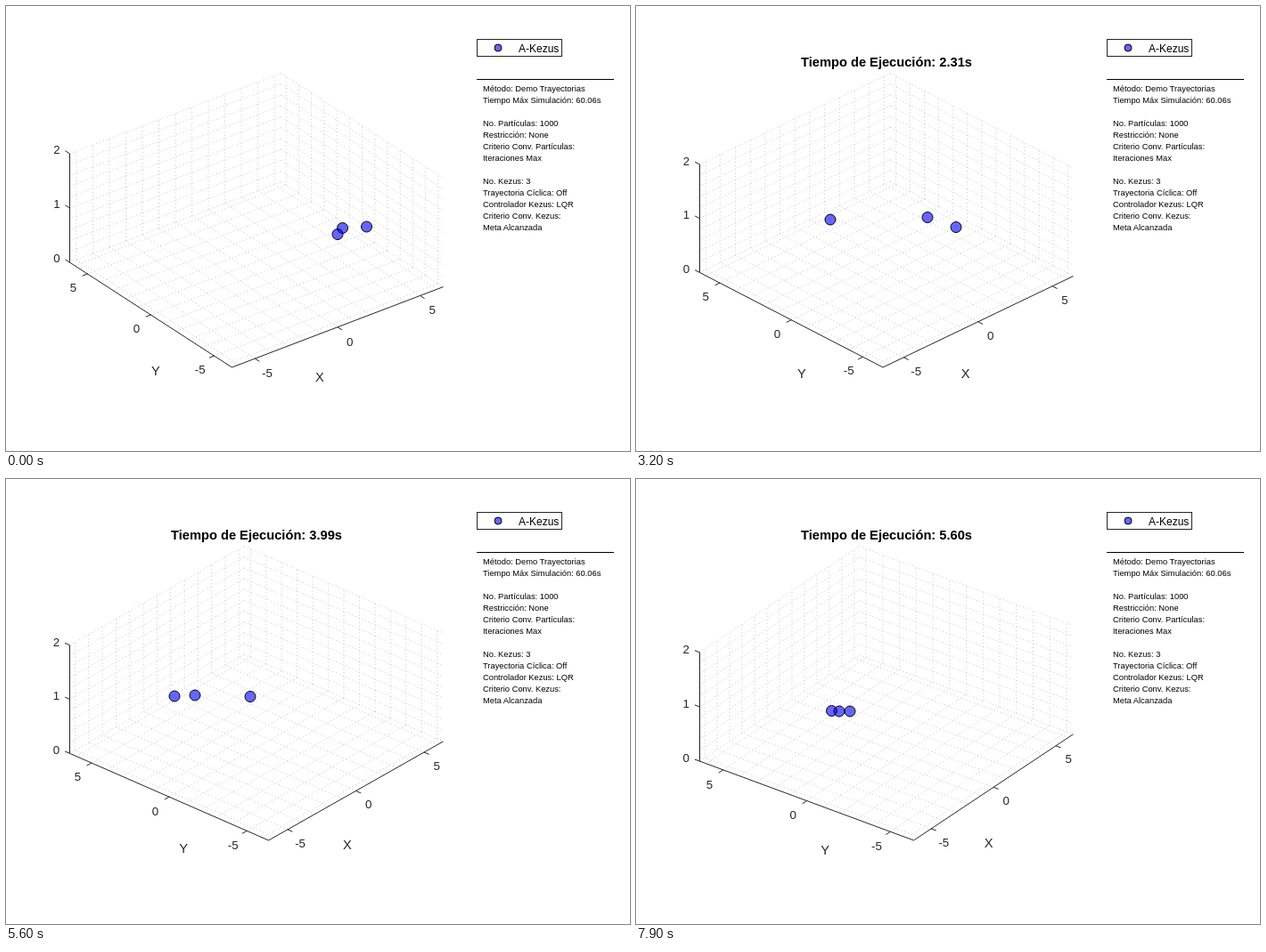
These frames come from a looping animation (700x500 px, 8 s). An HTML page:

```html
<!DOCTYPE html>
<html lang="es">
<head>
<meta charset="utf-8">
<title>Demo Trayectorias</title>
<style>
  html, body { margin: 0; width: 100%; height: 100%; overflow: hidden; background: #fff; }
  svg { display: block; font-family: "Liberation Sans", Arial, sans-serif; fill: #262626; }
  .grid { fill: none; stroke: #c6c6c6; stroke-dasharray: 1 3; }
  .axes { fill: none; stroke: #262626; }
  .puck { fill: #00f; fill-opacity: .6; stroke: #000; }
  .mid { text-anchor: middle; }
  .tick { font-size: 13.33px; }
  .name { font-size: 14.67px; }
  .title { font-size: 14.67px; font-weight: bold; fill: #000; }
  .info { font-size: 9.33px; fill: #000; }
</style>
</head>
<body>
<svg id="stage" width="700" height="500" viewBox="0 0 700 500"></svg>
<script>
const stage = document.getElementById("stage");

function add(tag, attrs, text) {
  const node = document.createElementNS("http://www.w3.org/2000/svg", tag);
  for (const key in attrs) node.setAttribute(key, attrs[key]);
  if (text) node.textContent = text;
  return stage.appendChild(node);
}
// Baselines sit on whole pixels
const place = (node, x, y) => {
  node.setAttribute("x", x.toFixed(2));
  node.setAttribute("y", Math.round(y));
};

const STEP = 100, LOOP = 8000, LAST = LOOP / STEP - 1;
const BOX = { left: 71.5, right: 490.5, top: 75.5, bottom: 406 };
const LIMIT = 6.4, Z_MAX = 2, TICK = 6;

const grid = add("path", { class: "grid" });
const axes = add("path", { class: "axes" });
const tickText = value => add("text", { class: "tick mid" }, String(value));
const labels = {
  x: [-5, 0, 5].map(v => [v, tickText(v)]),
  y: [-5, 0, 5].map(v => [v, tickText(v)]),
  z: [0, 1, 2].map(v => [v, tickText(v)])
};
const nameX = add("text", { class: "name mid" }, "X");
const nameY = add("text", { class: "name mid" }, "Y");
const title = add("text", { class: "title mid", x: 281, y: 68 });

// Legend and settings
add("rect", { x: 528.5, y: 37.5, width: 95, height: 19, fill: "#fff", stroke: "#262626" });
add("circle", { class: "puck", cx: 552, cy: 47, r: 4 });
add("text", { x: 575, y: 52, "font-size": 12, fill: "#000" }, "A-Kezus");
add("path", { d: "M528 82.5H682", stroke: "#000" });
[
  "Método: Demo Trayectorias", "Tiempo Máx Simulación: 60.06s", "",
  "No. Partículas: 1000", "Restricción: None", "Criterio Conv. Partículas:", "Iteraciones Max", "",
  "No. Kezus: 3", "Trayectoria Cíclica: Off", "Controlador Kezus: LQR",
  "Criterio Conv. Kezus:", "Meta Alcanzada"
].forEach((line, i) => add("text", { class: "info", x: 535, y: 96 + 13 * i }, line));

// Robot paths: screen positions at key steps
const keys = [0, 19, 32, 41, 56, 65, 79];
const pucks = [
  { x: [404.5, 274, 218, 201, 189, 186, 219.5], y: [248, 240.5, 240, 241.5, 244, 245.5, 260.5] },
  { x: [377.5, 357.5, 327, 270, 212, 198, 228], y: [249.5, 241, 237.5, 239.5, 243, 244.5, 261] },
  { x: [372, 368, 359, 347, 274, 230, 240], y: [256.5, 249.5, 248.5, 245, 244.5, 245, 261] }
].map(p => ({
  x: curve(p.x), y: curve(p.y),
  node: add("circle", { class: "puck", r: 6 })
}));

// Monotone cubic through the key values, starting from rest
function curve(values) {
  const last = keys.length - 1;
  const slope = values.slice(1).map((v, i) => (v - values[i]) / (keys[i + 1] - keys[i]));
  const tangent = values.map((_, i) => {
    if (i === 0 || i === last) return 0;
    const a = slope[i - 1], b = slope[i];
    return a * b > 0 ? 2 * a * b / (a + b) : 0;
  });
  tangent[last] = 1.5 * slope[last - 1] - 0.5 * tangent[last - 1];
  return n => {
    let i = 0;
    while (i < last - 1 && n > keys[i + 1]) i++;
    const h = keys[i + 1] - keys[i], u = (n - keys[i]) / h, w = 1 - u;
    return values[i] * (1 + 2 * u) * w * w + values[i + 1] * u * u * (3 - 2 * u)
      + h * u * w * (tangent[i] * w - tangent[i + 1] * u);
  };
}

// Orthographic view at 30° elevation, stretched to fill the box
function camera(degrees) {
  const angle = degrees * Math.PI / 180;
  const c = Math.cos(angle), s = Math.sin(angle), sum = c + s;
  const height = BOX.bottom - BOX.top;
  const floor = height * (sum / 2) / (sum / 2 + 0.4112);
  const rise = height - floor;
  const halfWidth = (BOX.right - BOX.left) / 2;
  return (x, y, z) => {
    const u = x / LIMIT, v = y / LIMIT;
    return [
      BOX.left + halfWidth * (1 + (c * u - s * v) / sum),
      BOX.bottom - floor / 2 * (1 + (s * u + c * v) / sum) - rise * z / Z_MAX
    ];
  };
}

const segment = (a, b) => `M${a.map(v => v.toFixed(2))}L${b.map(v => v.toFixed(2))}`;

function drawAxes(n) {
  const at = camera(37.5 + 0.2 * n), L = LIMIT, H = Z_MAX;
  const line = (a, b) => segment(at(...a), at(...b));

  let d = "";
  for (let i = -6; i <= 6; i++) {
    d += line([i, -L, 0], [i, L, 0]) + line([i, L, 0], [i, L, H]);
    d += line([-L, i, 0], [L, i, 0]) + line([L, i, 0], [L, i, H]);
  }
  for (let i = 0; i <= 10; i++) {
    const z = i * H / 10;
    d += line([-L, L, z], [L, L, z]) + line([L, L, z], [L, -L, z]);
  }
  grid.setAttribute("d", d);

  const front = at(-L, -L, 0), left = at(-L, L, 0), right = at(L, -L, 0);
  const unit = (a, b) => {
    const dx = b[0] - a[0], dy = b[1] - a[1], len = Math.hypot(dx, dy);
    return [dx / len, dy / len];
  };
  const alongX = unit(right, front), alongY = unit(left, front), outward = unit(front, left);

  d = line([-L, L, H], [-L, L, 0]) + segment(left, front) + segment(front, right);
  const ticks = (items, point, dir, dx, dy) => items.forEach(([value, node]) => {
    const p = point(value);
    const end = [p[0] + TICK * dir[0], p[1] + TICK * dir[1]];
    d += segment(p, end);
    place(node, end[0] + dx, end[1] + dy + 4.7);
  });
  ticks(labels.x, v => at(v, -L, 0), alongY, 8.6, 12.8);
  ticks(labels.y, v => at(-L, v, 0), alongX, -10.3, 12.8);
  ticks(labels.z, v => at(-L, L, v), outward, -9.6, -1.4);
  axes.setAttribute("d", d);

  const p = n / LAST, midX = at(0, -L, 0), midY = at(-L, 0, 0);
  place(nameX, midX[0] - 20 + 14.7 * p, midX[1] + 60.9 + 6.6 * p);
  place(nameY, midY[0] + 5.5 + 15 * p, midY[1] + 67.6 - 7 * p);
}

function draw(n) {
  drawAxes(n);
  title.textContent = n ? `Tiempo de Ejecución: ${(0.07 * (n + 1)).toFixed(2)}s` : "";
  for (const puck of pucks) {
    puck.node.setAttribute("cx", puck.x(n).toFixed(2));
    puck.node.setAttribute("cy", puck.y(n).toFixed(2));
  }
}

let shown = 0;
const start = performance.now();
function tick() {
  const n = Math.floor((performance.now() - start) % LOOP / STEP);
  if (n !== shown) draw(shown = n);
  requestAnimationFrame(tick);
}
draw(0);
requestAnimationFrame(tick);
</script>
</body>
</html>
```
